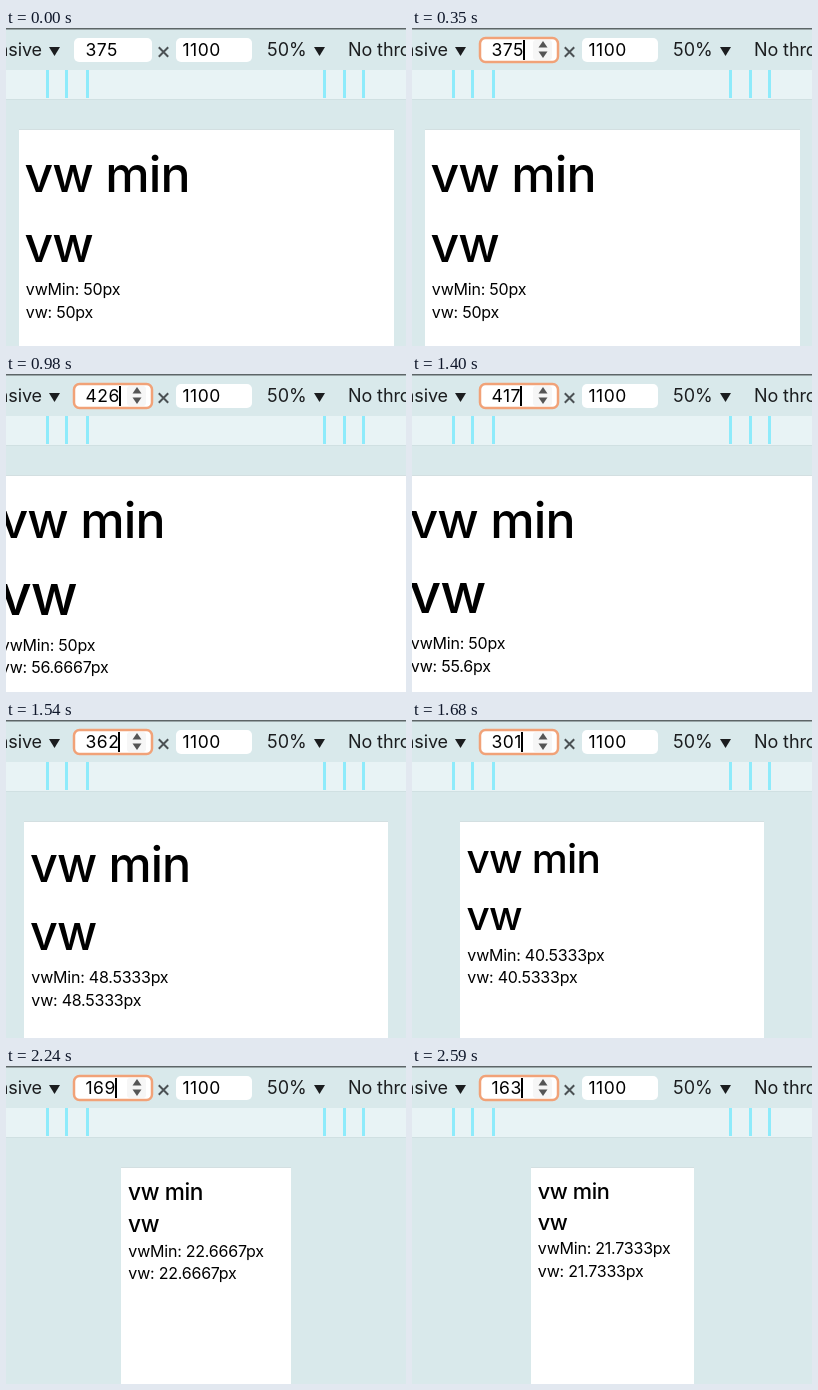
These frames come from a looping animation (400 px wide and 318 px high, 2660 ms). An HTML page with a canvas:

```html
<!DOCTYPE html>
<html lang="en">
<head>
<meta charset="utf-8">
<title>vw and min()</title>
<style>
html, body { margin: 0; width: 100%; height: 100%; overflow: hidden; background: #d9e9eb; }
canvas { display: block; width: 400px; height: 318px; }
</style>
</head>
<body>
<canvas id="stage" width="400" height="318"></canvas>
<script>
const ctx = document.getElementById('stage').getContext('2d');
const LOOP = 2660, STEP = 70, FOCUS_AT = 350;
const FONT = 'Inter, "Open Sans", sans-serif';
const INK = '#1b1d1f';

// time, number in the width field, laid-out page width
const KEYS = [
  [0, 375, 375], [630, 375, 375], [700, 375, 376], [980, 426, 425],
  [1190, 438, 438], [1400, 417, 417], [1680, 301, 304],
  [1960, 206, 207], [2170, 174, 175], [2450, 163, 163]
];

function slope(i, col) {
  if (i < 2 || i === KEYS.length - 1) return 0;
  const a = KEYS[i - 1], b = KEYS[i + 1];
  return (b[col] - a[col]) / (b[0] - a[0]);
}

// Smooth Hermite curve through the keys
function valueAt(t, col) {
  const last = KEYS.length - 1;
  if (t >= KEYS[last][0]) return KEYS[last][col];
  let i = 0;
  while (t >= KEYS[i + 1][0]) i++;
  const a = KEYS[i], b = KEYS[i + 1], d = b[0] - a[0];
  const u = (t - a[0]) / d, u2 = u * u, u3 = u2 * u;
  return Math.round(
    (2 * u3 - 3 * u2 + 1) * a[col] + (u3 - 2 * u2 + u) * d * slope(i, col) +
    (3 * u2 - 2 * u3) * b[col] + (u3 - u2) * d * slope(i + 1, col));
}

function rect(x, y, w, h, color) {
  ctx.fillStyle = color;
  ctx.fillRect(x, y, w, h);
}

function rounded(x, y, w, h, r, color) {
  ctx.fillStyle = color;
  ctx.beginPath();
  ctx.roundRect(x, y, w, h, r);
  ctx.fill();
}

function text(str, x, y, size, { color = INK, spacing = 0, align = 'left', weight = 400 } = {}) {
  ctx.font = `${weight} ${size}px ${FONT}`;
  ctx.letterSpacing = `${spacing}px`;
  ctx.textAlign = align;
  ctx.fillStyle = color;
  ctx.fillText(str, x, y);
  return ctx.measureText(str).width;
}

// Triangle centred on x, with its base at y and its tip h below (or above)
function triangle(x, y, w, h, color) {
  ctx.fillStyle = color;
  ctx.beginPath();
  ctx.moveTo(x - w / 2, y);
  ctx.lineTo(x + w / 2, y);
  ctx.lineTo(x, y + h);
  ctx.fill();
}

function cross(x, y, r) {
  ctx.strokeStyle = '#4b5154';
  ctx.lineWidth = 2;
  ctx.beginPath();
  ctx.moveTo(x - r, y - r);
  ctx.lineTo(x + r, y + r);
  ctx.moveTo(x + r, y - r);
  ctx.lineTo(x - r, y + r);
  ctx.stroke();
}

function drawToolbar(width, focused) {
  rect(0, 0, 400, 42, '#d9e9eb');
  rect(0, 0, 400, 1, '#5d6567');
  rect(0, 1, 400, 1, '#9aa6a8');
  text('Responsive', 36, 28, 18, { spacing: -0.1, align: 'right' });
  triangle(48.5, 19, 11, 9, INK);

  rounded(68, 10, 78, 24, 5, '#fff');
  if (focused) {
    rounded(121, 12, 19, 20, 3, '#f6f6f6');
    triangle(131, 19.5, 9, -6.5, '#555');
    triangle(131, 23.5, 9, 6.5, '#555');
    ctx.strokeStyle = '#f1a278';
    ctx.lineWidth = 2.5;
    ctx.beginPath();
    ctx.roundRect(68, 10, 78, 24, 5.5);
    ctx.stroke();
  }
  const digits = { color: '#000', spacing: 0.5 };
  const advance = text(String(width), 79.5, 28, 17.5, digits);
  if (focused) rect(Math.round(78.5 + advance), 12, 2, 20, '#000');

  cross(157.5, 24, 4.7);
  rounded(170, 10, 76, 24, 5, '#fff');
  text('1100', 176.5, 28, 17.5, digits);
  text('50%', 261, 28, 18);
  triangle(313.5, 19, 11, 9, INK);
  text('No throttling', 342, 28, 18, { spacing: -0.1 });
}

function drawRuler() {
  rect(0, 42, 400, 29, '#e8f3f5');
  rect(0, 41, 400, 1, '#cfdfe1');
  rect(0, 71, 400, 1, '#d0e0e2');
  for (const x of [40, 59, 80, 317, 337, 356]) rect(x, 42, 3, 28, '#8eebfb');
}

function drawPage(width) {
  const left = (400 - width) / 2;
  const edge = Math.round(left), right = Math.round(left + width);
  rect(edge, 101, right - edge, 217, '#fff');
  rect(edge, 101, right - edge, 1, '#d3dfe1');

  const vw = width * 50 / 375, min = Math.min(50, vw);
  const px = n => `${+n.toFixed(4)}px`;
  let top = 110;
  const line = (str, size, spacing, weight) => {
    const baseline = Math.round(top + size * 1.064 + 0.3);
    text(str, left + 8 - 0.04 * size, baseline, size, { color: '#000', spacing, weight });
    top += size * 1.4;
  };
  line('vw min', min, -0.018 * min, 450);
  line('vw', vw, -0.018 * vw, 450);
  line('vwMin: ' + px(min), 16, -0.22);
  line('vw: ' + px(vw), 16, -0.22);
}

function draw(now) {
  const t = Math.floor((now % LOOP) / STEP) * STEP;
  rect(0, 0, 400, 318, '#d9e9eb');
  drawRuler();
  drawPage(valueAt(t, 2));
  drawToolbar(valueAt(t, 1), t >= FOCUS_AT);
}

const start = performance.now();
function tick() {
  draw(performance.now() - start);
  requestAnimationFrame(tick);
}
tick();
</script>
</body>
</html>
```
